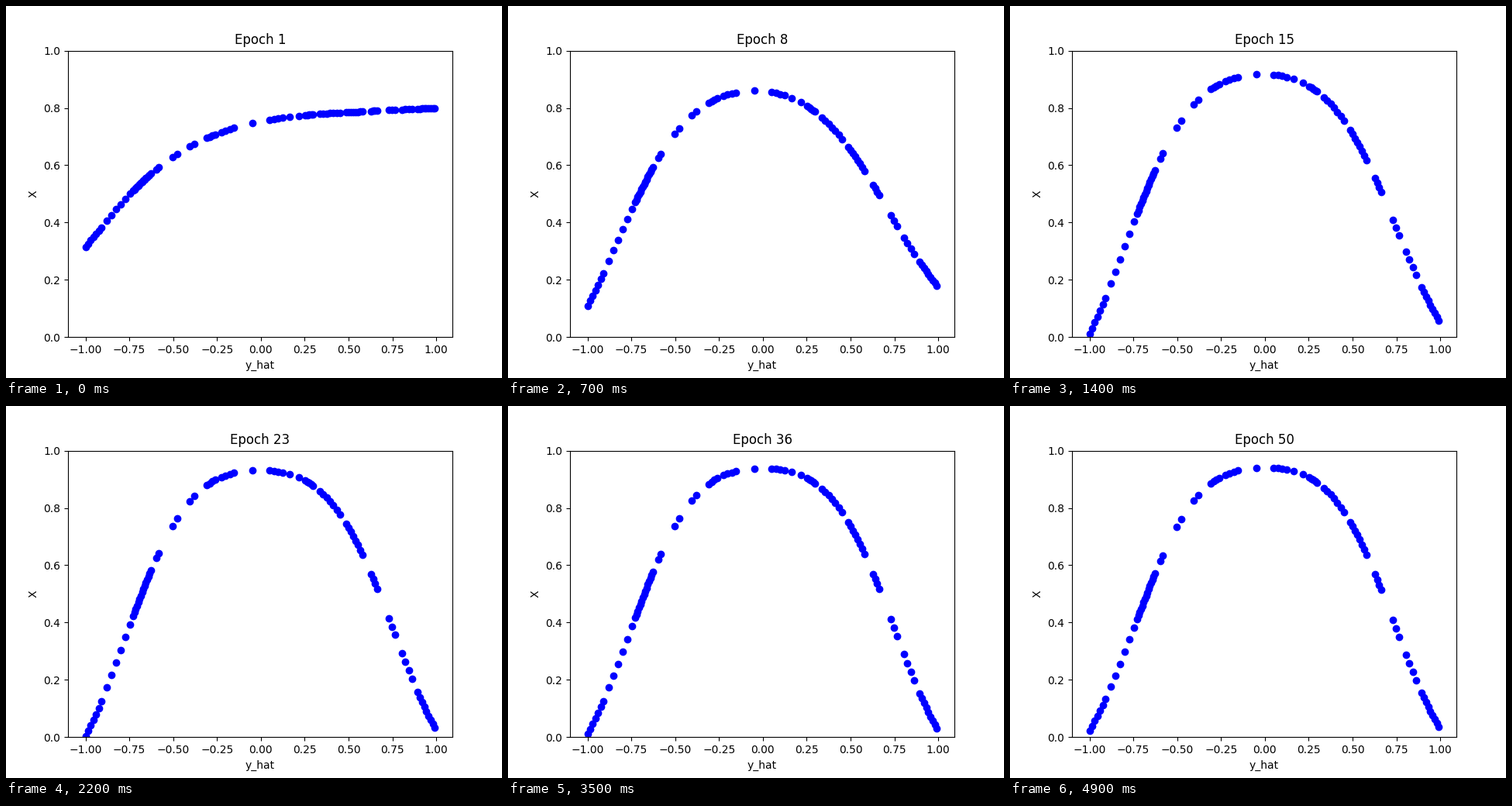
These frames come from a looping animation (640x480 px, 5000 ms). A matplotlib script:

```python
import numpy as np
import matplotlib.pyplot as plt
from matplotlib.animation import FuncAnimation

EPOCHS = 50

# Evenly spaced groups of samples: start, stop, count
GROUPS = [
    (-1, -.91, 7), (-.878, -.746, 6), (-.728, -.627, 15), (-.596, -.583, 2),
    (-.503, -.477, 2), (-.406, -.38, 2), (-.309, -.26, 4), (-.225, -.154, 4),
    (-.048, -.048, 1), (.049, .125, 4), (.164, .217, 2), (.253, .298, 5),
    (.337, .452, 7), (.487, .58, 8), (.629, .664, 4), (.73, .766, 3),
    (.805, .863, 4), (.894, .9925, 9),
]
x = np.concatenate([np.linspace(*group) for group in GROUPS])

# Key poses of the learned curve, given at a few knots
KNOTS = [-1, -.91, -.727, -.38, -.048, .298, .664, .863, .9925]
POSES = {
    1: [.315, .383, .512, .674, .747, .777, .790, .796, .799],
    5: [.228, .322, .515, .746, .799, .719, .508, .390, .326],
    11: [.040, .163, .445, .813, .898, .832, .498, .240, .100],
    23: [.003, .124, .425, .841, .931, .878, .518, .203, .032],
    50: [.022, .132, .414, .844, .940, .889, .514, .198, .035],
}

# A polynomial through each pose, blended smoothly over log(epoch)
curves = np.array([np.polyval(np.polyfit(KNOTS, pose, len(KNOTS) - 1), x)
                   for pose in POSES.values()])
times = np.log(list(POSES))
slopes = np.gradient(curves, times, axis=0)


def predict(epoch):
    """Cubic Hermite step between the neighbouring poses."""
    t = np.log(epoch)
    i = min(np.searchsorted(times, t, side="right") - 1, len(times) - 2)
    h = times[i + 1] - times[i]
    u = (t - times[i]) / h
    start = (1 + 2 * u) * curves[i] + u * h * slopes[i]
    end = (3 - 2 * u) * curves[i + 1] + (u - 1) * h * slopes[i + 1]
    return (1 - u) ** 2 * start + u ** 2 * end


fig, ax = plt.subplots(figsize=(6.4, 4.8), dpi=100)
dots = ax.scatter(x, predict(1), color="blue")
ax.set(ylim=(0, 1), xlabel="y_hat", ylabel="X")
title = ax.set_title("Epoch 1")


def update(frame):
    epoch = frame + 1
    dots.set_offsets(np.column_stack([x, predict(epoch)]))
    title.set_text(f"Epoch {epoch}")
    return dots, title


anim = FuncAnimation(fig, update, frames=EPOCHS, interval=100, repeat=True,
                     repeat_delay=0)
plt.show()
```
